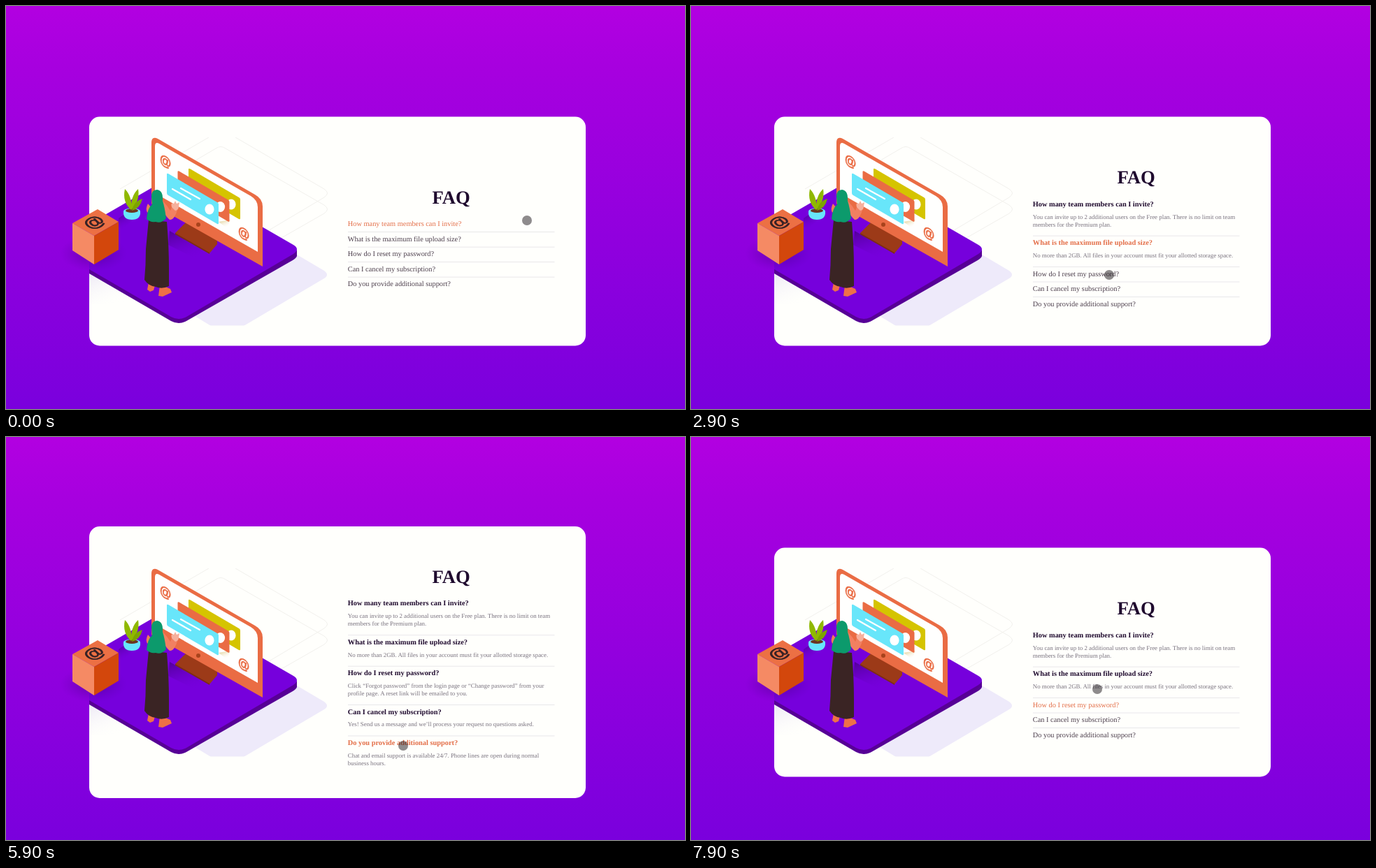
An HTML page that plays this animation: 971x577 px, repeating every 8000 ms.

```html
<!DOCTYPE html>
<html lang="en">
<head>
<meta charset="utf-8">
<title>FAQ accordion</title>
<style>
html, body { margin: 0; width: 100%; height: 100%; overflow: hidden; }
body { background: linear-gradient(#b200e1, #a700df 15%, #7a00dd); }
svg { display: block; width: 971px; height: 577px; }
text { font-family: "Liberation Serif", "Times New Roman", serif; text-rendering: geometricPrecision; }
.at { font: bold 19px "Liberation Sans", Arial, sans-serif; text-anchor: middle; stroke-width: .7; }
.title { font-size: 26.63px; font-weight: bold; fill: #1f0a2e; text-anchor: middle; }
.q { font-size: 10.355px; fill: #4b3d4c; }
.q.open { font-weight: bold; fill: #1f0a2e; }
.q.focus { fill: #e36d47; }
.a { font-size: 8.876px; fill: #79727f; }
</style>
</head>
<body>
<svg viewBox="0 0 971 577">
  <defs>
    <clipPath id="inside"><rect x="119" y="188" width="345" height="269.5"/></clipPath>
    <linearGradient id="fade" x2="0.6" y2="1">
      <stop stop-color="#d9d0ee"/><stop offset="1" stop-color="#fffffc" stop-opacity="0"/>
    </linearGradient>
    <linearGradient id="glow" x2="0.6" y2="1">
      <stop stop-color="#d8c070"/><stop offset="1" stop-color="#fff" stop-opacity="0"/>
    </linearGradient>
    <linearGradient id="shade" x2="0.4" y2="1">
      <stop stop-color="#3f0078"/><stop offset="1" stop-color="#7600dc" stop-opacity="0"/>
    </linearGradient>
    <radialGradient id="soft">
      <stop offset=".3" stop-color="#3f0078"/><stop offset="1" stop-color="#5a00a8" stop-opacity="0"/>
    </radialGradient>
  </defs>

  <rect id="card" x="119" width="710" rx="15" fill="#fffffc"/>

  <g clip-path="url(#inside)">
    <g fill="none" stroke="#f1f0ec">
      <path d="M163 262L290 188M328 188L455 262Q464 268 455 274L366 327"/>
      <path d="M208 258L300 204Q307 199 314 204L455 285Q464 291 455 297L366 348"/>
    </g>
    <path d="M416 356L455 379Q463 385 455 390L340 458H293L247 430Z" fill="#eeeafa"/>
    <path d="M119 381L188 420Q150 430 119 426Z" fill="url(#fade)" opacity=".5"/>
    <path d="M119 318L209 266L366 324L410 343L416 350V358Q415 361 410 364L258 451Q247 457 236 451L119 383Z" fill="#570096"/>
    <path d="M119 312L209 260L300 270L366 316L411 342Q421 348 411 355L258 445Q247 451 236 445L119 377Z" fill="#7600dc"/>
    <path d="M161 304L171 297L182 306L166 320L161 317Z" fill="url(#shade)" opacity=".7"/>
    <path d="M234 322L292 354L280 366L232 342Z" fill="url(#shade)" opacity=".7"/>
  </g>
  <ellipse cx="125" cy="354" rx="48" ry="26" fill="url(#soft)" opacity=".35"/>

  <g id="cube">
    <path d="M131 291L161 309L126 329L95 311Z" fill="#ec7044"/>
    <path d="M95 311L126 329V370L95 350Z" fill="#f58a64"/>
    <path d="M161 309L126 329V370L161 349Z" fill="#d3470c"/>
    <text class="at" transform="matrix(.87 -.5 .87 .5 126 310)" y="8" style="font-size:26px" fill="#352126" stroke="#352126">@</text>
  </g>

  <g id="plant">
    <path d="M168 294Q167 306 180 306Q193 306 192 294Z" fill="#68e6fa"/>
    <ellipse cx="180" cy="294" rx="12" ry="4.5" fill="#68e6fa"/>
    <ellipse cx="180" cy="293" rx="9" ry="3" fill="#6b3520"/>
    <path d="M179 292Q166 281 170 262Q181 273 179 292M179 292Q178 272 189 262Q192 279 179 292" fill="#8fb800"/>
    <path d="M180 293Q183 279 195 276Q192 290 180 293" fill="#7da300"/>
  </g>

  <g id="monitor">
    <path d="M242 325L262 305L302 330V341L291 354L243 327Z" fill="#9c3a18"/>
    <path d="M242 325L291 353V355L242 327Z" fill="#7c2d14"/>
    <path d="M208 283V196Q208 186 217 190L356 270Q367 276 367 287V373Z" fill="#ea6c44"/>
    <path d="M213 268V201Q213 194 219 197L350 272Q360 278 360 288V352Z" fill="#fffffe"/>
    <circle cx="275" cy="313" r="3" fill="#a8431c"/>
    <g fill="#ea6c44" stroke="#ea6c44">
      <text class="at" transform="matrix(.87 .5 0 1 228 222)" y="6.5">@</text>
      <text class="at" transform="matrix(.87 .5 0 1 340 325)" y="6.5">@</text>
    </g>
    <path d="M304 309L321 306L316 318Z" fill="url(#glow)"/>
    <g id="slips"></g>
    <path d="M250 261L277 276M238 262L264 277" stroke="#fff" stroke-width="2.2" stroke-linecap="round"/>
  </g>

  <g id="woman">
    <path d="M203 283Q199 290 202 296L208 289Z" fill="#f07c58"/>
    <path d="M224 279Q231 286 235 293L238 286L246 289Q241 307 234 306Q227 300 224 291Z" fill="#f28061"/>
    <path d="M237 288Q235 281 240 283L242 279L244 283L248 281L247 287Q247 292 242 293Z" fill="#f6b09c"/>
    <path d="M204 396L202 406L206 409L211 407L214 397ZM220 400L218 415L224 416L237 410L235 405L228 402Z" fill="#ee7047"/>
    <path d="M204 306L230 309Q233 345 233 375L233 401Q223 406 214 402Q204 401 198 392Q200 371 200 348Z" fill="#3a2424"/>
    <path d="M208 273Q208 263 216 263Q225 264 224 279Q227 288 229 304Q222 312 214 309Q206 310 201 305Q202 290 209 284Z" fill="#0c9a6c"/>
  </g>

  <g id="faq"></g>
  <circle id="cursor" r="7" fill="#1e181c" opacity=".5"/>
</svg>

<script>
const ITEMS = [
  { opens: 1000, question: "How many team members can I invite?", answer: [
    "You can invite up to 2 additional users on the Free plan. There is no limit on team", "members for the Premium plan."] },
  { opens: 2500, question: "What is the maximum file upload size?", answer: [
    "No more than 2GB. All files in your account must fit your allotted storage space."] },
  { opens: 3200, closes: 7200, question: "How do I reset my password?", answer: [
    "Click “Forgot password” from the login page or “Change password” from your", "profile page. A reset link will be emailed to you."] },
  { opens: 4000, closes: 6800, question: "Can I cancel my subscription?", answer: [
    "Yes! Send us a message and we’ll process your request no questions asked."] },
  { opens: 4800, closes: 6100, question: "Do you provide additional support?", answer: [
    "Chat and email support is available 24/7. Phone lines are open during normal", "business hours."] }
];
// Cursor stops: [arrival ms, x, y]
const STOPS = [
  [0, 745, 307], [400, 646, 307], [700, 641, 313], [1400, 756, 335], [1700, 670, 342],
  [1900, 601, 347], [2600, 602, 363], [2900, 598, 385], [3700, 594, 419], [4600, 592, 455],
  [5100, 668, 477], [5300, 718, 476], [5600, 568, 442], [6700, 579, 413], [7200, 587, 370], [7900, 581, 361]
];
const MOVE = 200, ROW = 21.5, LINE = 11, LEFT = 488.8, MIDDLE = 322.5;
const $ = id => document.getElementById(id);

function add(parent, tag, attrs, text = "") {
  const el = document.createElementNS("http://www.w3.org/2000/svg", tag);
  for (const k in attrs) el.setAttribute(k, attrs[k]);
  el.textContent = text;
  return parent.appendChild(el);
}
const setY = (el, y) => el.setAttribute("y", y);

["#d5c400", "#ea6c44", "#68e6fa"].forEach((fill, i) => {
  const x = 261 - 15.5 * i, y = 232 + 3.5 * i;
  add($("slips"), "path", { d: `M${x} ${y + 2}q0 -2 2 -1l70 41q2 1 2 3v27q0 2 -2 1l-70 -41q-2 -1 -2 -3z`, fill });
  add($("slips"), "ellipse", { cx: x + 61, cy: y + 52, rx: 6.6, ry: 7.4, fill: "#fff" });
});

const title = add($("faq"), "text", { x: 636.7, class: "title" }, "FAQ");
const rows = ITEMS.map(({ opens, closes = Infinity, question, answer }, i) => ({
  opens, closes,
  q: add($("faq"), "text", { x: LEFT, class: "q" }, question),
  lines: answer.map(s => add($("faq"), "text", { x: LEFT, class: "a" }, s)),
  rule: i < 4 && add($("faq"), "rect", { x: 489, width: 295.5, height: 0.8, fill: "#e3e1e6" }),
  extra: 11.9 + LINE * answer.length
}));

function cursorAt(t) {
  let [, x, y] = STOPS[0];
  for (const [end, nx, ny] of STOPS) {
    const k = Math.min(1, Math.max(0, (t - end + MOVE) / MOVE));
    x += (nx - x) * k;
    y += (ny - y) * k;
  }
  return [x, y];
}

function draw(t) {
  const isOpen = r => t >= r.opens && t < r.closes;
  const lastClick = r => Math.max(0, ...[r.opens, r.closes].filter(at => at <= t));
  const focus = rows.reduce((a, b) => lastClick(b) > lastClick(a) ? b : a);
  const grown = rows.filter(isOpen).reduce((sum, r) => sum + r.extra, 0);

  const height = Math.max(328, 241.5 + grown);
  setY($("card"), MIDDLE - height / 2);
  $("card").setAttribute("height", height);

  let y = 315.2 - grown / 2;
  setY(title, y - 32.5);
  for (const r of rows) {
    const open = isOpen(r);
    r.q.setAttribute("class", "q" + (open ? " open" : "") + (r === focus ? " focus" : ""));
    setY(r.q, y);
    r.lines.forEach((line, n) => {
      line.style.display = open ? "" : "none";
      setY(line, y + 17.7 + n * LINE);
    });
    y += open ? r.extra : 0;
    if (r.rule) setY(r.rule, y + 8);
    y += ROW;
  }

  const [cx, cy] = cursorAt(t);
  $("cursor").setAttribute("cx", cx);
  $("cursor").setAttribute("cy", cy);
}

// The picture advances ten times a second.
function tick() {
  draw(Math.floor(performance.now() % 8000 / 100) * 100);
  requestAnimationFrame(tick);
}
tick();
</script>
</body>
</html>
```
